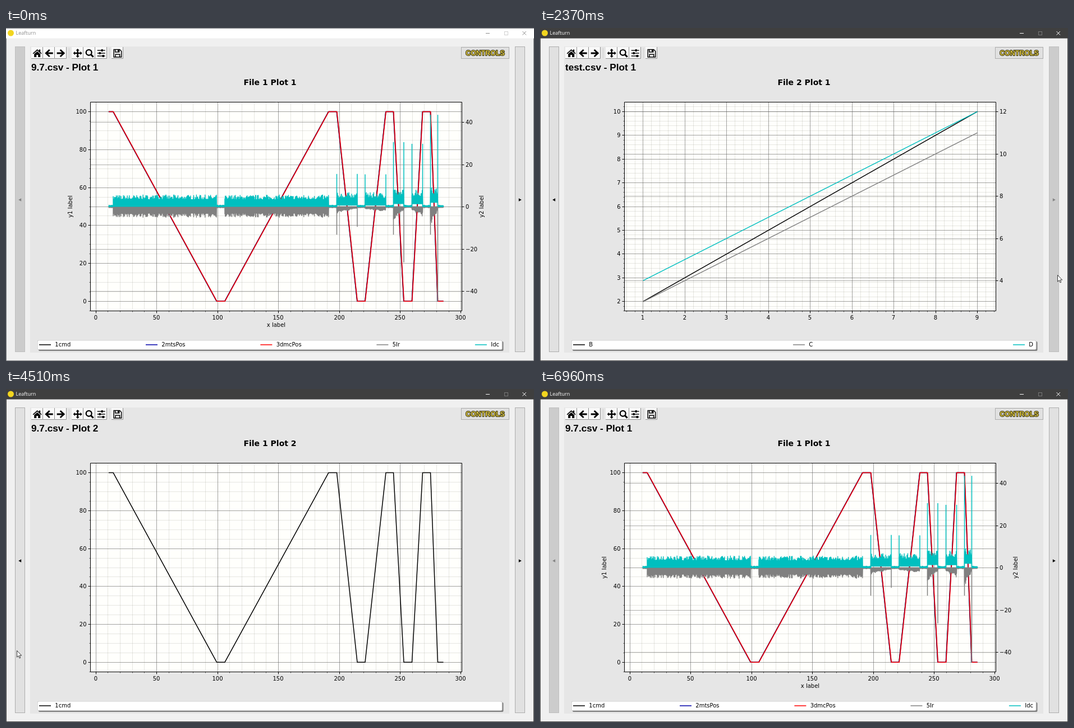
These frames come from a looping animation (941x595 px, 7010 ms). An HTML page with a canvas:

```html
<!DOCTYPE html>
<html lang="en">
<head>
<meta charset="utf-8">
<title>Leafturn</title>
<style>
html, body { margin: 0; width: 100%; height: 100%; overflow: hidden; background: #f0f0f0; }
canvas { display: block; }
</style>
</head>
<body>
<canvas id="stage" width="941" height="595"></canvas>
<script>
const W = 941, H = 595, LOOP = 7010, STEP = 46;
const BOX = { l: 150.5, r: 812.5, t: 132.5, b: 505.5 };
const SMALL = '10px "DejaVu Sans", sans-serif';
const TITLE = 'bold 14px "DejaVu Sans", sans-serif';
const arial = size => `bold ${size}px "Liberation Sans", Arial, sans-serif`;
const GRAY = '#808080', CYAN = '#00bfbf', BLUE = '#0000a8', RED = '#f00', BLACK = '#000';
const stage = document.getElementById('stage').getContext('2d');
let c = stage;

// ---------- drawing helpers ----------
function rect(x, y, w, h, fill, border) {
  c.fillStyle = fill;
  c.fillRect(x, y, w, h);
  if (border) {
    c.strokeStyle = border;
    c.lineWidth = 1;
    c.strokeRect(x + .5, y + .5, w - 1, h - 1);
  }
}
function line(points, color = BLACK, width = 1) {
  c.beginPath();
  points.forEach(([x, y]) => c.lineTo(x, y));
  c.strokeStyle = color;
  c.lineWidth = width;
  c.stroke();
}
function dot(x, y, r, color) {
  c.beginPath();
  c.arc(x, y, r, 0, 7);
  c.fillStyle = color;
  c.fill();
}
function panel(x, y, w, h, fill) {
  c.beginPath();
  c.roundRect(x, y, w, h, 2);
  c.fillStyle = fill;
  c.fill();
}
function text(s, x, y, font = SMALL, align = 'left', color = BLACK) {
  c.font = font;
  c.textAlign = align;
  c.fillStyle = color;
  c.fillText(s, x, y);
}
function placed(x, y, angle, draw) {
  c.save();
  c.translate(x, y);
  c.rotate(angle);
  draw();
  c.restore();
}
const snap = p => Math.round(p) + .5;

// ---------- plot data: the position holds and moves in turn between these moments ----------
const times = [183, 191, 375.5, 390, 575, 589.5, 626, 640, 677, 690.5, 709, 723.5, 742.5, 756.5, 769.5, 779.5];
const TOP = 149.4, BOTTOM = 488.2, ZERO = 319.3;
const ramp = times.map((x, i) => [x, i % 4 < 2 ? TOP : BOTTOM]);
const phases = times.slice(1).map((x1, i) => {
  const x0 = times[i], speed = i % 2 ? (BOTTOM - TOP) / (x1 - x0) : 0;
  return { x0, x1, speed, fast: speed > 5, falling: i % 4 === 1 };
});

// A jagged band around zero whose size follows the speed, with peaks where fast moves start and stop
function noise(color, { outer, inner, peaks }) {
  let seed = 7;
  const rand = () => (seed = seed * 16807 % 2147483647) / 2147483647;
  const points = [];
  for (const phase of phases) {
    const { x0, x1 } = phase;
    for (let x = x0; x < x1; x += .7) {
      const reach = outer(phase, (x - x0) / (x1 - x0)) * (.6 + .4 * rand() ** 2);
      points.push([x, ZERO - reach], [x + .35, ZERO - inner(phase)]);
    }
  }
  c.lineJoin = 'round';
  line(points, color, 1.4);
  for (const phase of phases.filter(p => p.fast))
    peaks(phase).forEach((size, i) =>
      line([[i ? phase.x1 : phase.x0, ZERO], [i ? phase.x1 : phase.x0, ZERO - size]], color, 1.5));
}
const current = {
  outer: ({ speed }) => speed ? 20 + .6 * speed : 3,
  inner: ({ speed }) => .3 * speed,
  peaks: ({ speed }) => [6.3 * speed, 6.3 * speed]
};
const drag = {
  outer: ({ speed, fast, falling }, k) =>
    fast ? -speed * (falling ? 1.3 - k : .4 + .6 * k) : speed ? -19 : -2,
  inner: () => 0,
  peaks: ({ speed, falling }) => falling ? [-50, -1.27 * speed ** 1.5] : []
};

// ---------- pages: an axis has the pixel of zero, pixels per unit, major and minor step ----------
const timeAxis = { o: 159.7, k: 2.169, major: 50, minor: 10 };
const posAxis = { o: 488, k: -3.39, major: 20, minor: 5 };
const pages = [
  {
    file: '9.7.csv - Plot 1', title: 'File 1 Plot 1', x: timeAxis, y: posAxis,
    y2: { o: 319.2, k: -3.777, major: 20 }, named: true,
    legend: [['1cmd', BLACK], ['2mtsPos', BLUE], ['3dmcPos', RED], ['5Ir', GRAY], ['Idc', CYAN]],
    plot() {
      [BLACK, BLUE, RED].forEach((color, i) =>
        line(ramp.map(([x, y]) => [x + .25 * (i - 1), y]), color, 1.5));
      noise(GRAY, drag);
      noise(CYAN, current);
    }
  },
  {
    file: '9.7.csv - Plot 2', title: 'File 1 Plot 2', x: timeAxis, y: posAxis,
    legend: [['1cmd', BLACK]],
    plot() { line(ramp, BLACK, 1.5); }
  },
  {
    file: 'test.csv - Plot 1', title: 'File 2 Plot 1',
    x: { o: 108.9, k: 74.5, major: 1, minor: .2 },
    y: { o: 573.2, k: -42.44, major: 1, minor: .2 },
    y2: { o: 602, k: -37.75, major: 2 },
    legend: [['B', BLACK], ['C', GRAY], ['D', CYAN]],
    plot() {
      const trend = (axis, first, color) => line([1, 9].map(n =>
        [this.x.o + this.x.k * n + .3, axis.o + axis.k * (first + n - 1) + .3]), color, 1.5);
      trend(this.y, 2, BLACK);
      trend(this.y2, 3, GRAY);
      trend(this.y2, 4, CYAN);
    }
  }];

function ticks({ o, k }, step, lo, hi) {
  const [from, to] = [(lo - o) / k, (hi - o) / k].sort((a, b) => a - b);
  const list = [];
  for (let n = Math.ceil(from / step); n * step <= to; n++)
    list.push({ label: String(n * step).replace('-', '\u2212'), p: snap(o + n * step * k) });
  return list;
}

function drawAxes({ x, y, y2 }) {
  const { l, r, t, b } = BOX;
  const minor = 'rgba(130,130,120,.2)', major = 'rgba(100,100,100,.52)';
  const vert = (p, color, len, width) => {
    line([[p, t], [p, b]], color);
    line([[p, b], [p, b + len]], BLACK, width);
  };
  const horiz = (p, color, from, to, width) => {
    line([[l, p], [r, p]], color);
    line([[from, p], [to, p]], BLACK, width);
  };
  rect(l, t, r - l, b - t, '#fffffc');
  ticks(x, x.minor, l, r).forEach(({ p }) => vert(p, minor, 2, .6));
  ticks(y, y.minor, t, b).forEach(({ p }) => horiz(p, minor, l - 2, l, .6));
  ticks(x, x.major, l, r).forEach(({ label, p }) => {
    vert(p, major, 4);
    text(label, p - .5, 520.5, SMALL, 'center');
  });
  ticks(y, y.major, t, b).forEach(({ label, p }) => {
    horiz(p, major, l - 4, l);
    text(label, 143.5, p + 3.3, SMALL, 'right');
  });
  if (y2) ticks(y2, y2.major, t, b).forEach(({ label, p }) => {
    horiz(p, major, r, r + 4);
    text(label, 819, p + 3.3);
  });
}

// Entries spread evenly from edge to edge
function drawLegend(items) {
  const left = 59, right = 879, lead = 28.3;
  panel(58, 560, 828.5, 17, GRAY);
  panel(56, 557.7, 828.5, 17, '#ccc');
  panel(56.7, 558.4, 827, 15.8, '#fff');
  c.font = SMALL;
  const widths = items.map(([name]) => lead + c.measureText(name).width);
  const gap = (right - left - widths.reduce((a, b) => a + b)) / (items.length - 1);
  let x = left;
  items.forEach(([name, color], i) => {
    line([[x, 566], [x + 21, 566]], color, 1.5);
    text(name, x + lead, 569);
    x += widths[i] + gap;
  });
}

// ---------- toolbar ----------
const fill = shape => c.fill(new Path2D(shape));
const arrowIcon = () => fill('M-7.5 0L0-7L2-5.2L-1.8-1.5H7V1.5H-1.8L2 5.2L0 7Z');
const icons = [
  [55, () => fill('M-8 .2L0-7L3-4.3V-6.5H5.5V-2L8 .2L7 1.4L0-4.7L-7 1.4ZM-5.5 1.5L0-3.2L5.5 1.5V7H1.5V3H-1.5V7H-5.5Z')],
  [76, arrowIcon],
  [97, () => { c.rotate(Math.PI); arrowIcon(); }],
  [127, () => {
    for (let i = 0; i < 4; i++) {
      fill('M0-8L3.2-4.8H1.2V0H-1.2V-4.8H-3.2Z');
      c.rotate(Math.PI / 2);
    }
  }],
  [148, () => {
    dot(-1, -1.2, 6.1, BLACK);
    dot(-1, -1.2, 3.8, '#f9f9f9');
    line([[2.8, 2.6], [7, 6.8]], BLACK, 3);
  }],
  [169, () => [1, -3, 3].forEach((knob, i) => {
    rect(-7, i * 5 - 5.7, 14, 1.4, BLACK);
    rect(knob - 1, i * 5 - 7, 3, 4, BLACK);
  })],
  [198, () => {
    c.lineWidth = 1.5;
    c.stroke(new Path2D('M-6.5-6.5H4L7-3.5V7H-6.5ZM-4-6.5V-2H3V-6.5M-3.5 7V2H4V7'));
    rect(.3, -6, 2, 3, BLACK);
  }]];

function drawToolbar() {
  for (const [x, draw] of icons) {
    rect(x - 10, 34, 21, 21, '#f9f9f9');
    line([[x - 10, 54.5], [x + 10.5, 54.5], [x + 10.5, 34]], '#909090');
    c.fillStyle = c.strokeStyle = BLACK;
    placed(x + .7, 45, 0, draw);
  }
  for (const x of [112.5, 184.5]) line([[x, 36], [x, 54]], '#d0d0d0');
  rect(811, 34, 86, 21, '#e1e1e1', '#adadad');
  c.font = arial(12.4);
  c.textAlign = 'center';
  c.lineJoin = 'round';
  c.lineWidth = 1.9;
  c.strokeStyle = '#2e2a10';
  c.strokeText('CONTROLS', 854, 49);
  text('CONTROLS', 854, 49, arial(12.4), 'center', '#dcc640');
}

function renderPage(page) {
  const canvas = Object.assign(document.createElement('canvas'), { width: W, height: H });
  const { l, r, t, b } = BOX;
  c = canvas.getContext('2d');
  rect(0, 0, W, H, '#f0f0f0');
  rect(43, 33, 854, 547, '#e6e6e6');
  drawToolbar();
  text(page.file, 45, 75.5, arial(17.2));
  text(page.title, 470.5, 102.3, TITLE, 'center');
  drawAxes(page);
  page.plot();
  c.strokeStyle = BLACK;
  c.lineWidth = 1;
  c.strokeRect(l, t, r - l, b - t);
  if (page.named) {
    text('x label', 481.5, 534, SMALL, 'center');
    placed(117.5, 319, -Math.PI / 2, () => text('y1 label', 0, 0, SMALL, 'center'));
    placed(850.5, 319, -Math.PI / 2, () => text('y2 label', 0, 0, SMALL, 'center'));
  }
  drawLegend(page.legend);
  c = stage;
  return canvas;
}
const sheets = pages.map(renderPage);

// ---------- window parts ----------
function drawTitleBar(active) {
  const ink = active ? '#fff' : '#8c8c8c', dim = active ? '#777' : '#d0d0d0';
  c.strokeStyle = active ? '#404040' : '#75787c';
  c.lineWidth = 1;
  c.strokeRect(.5, .5, W - 1, H - 1);
  rect(0, active ? 0 : 1, W, active ? 18.5 : 17.5, active ? '#3f3f3f' : '#fff');
  dot(8.5, 9, 5.5, '#f2d51f');
  text('Leafturn', 17.5, 12.3, '9px "Open Sans", sans-serif', 'left', ink);
  line([[855, 9.5], [862, 9.5]], ink);
  c.strokeStyle = dim;
  c.strokeRect(888.5, 6.5, 6, 6);
  line([[920.5, 6], [927, 12.5]], ink);
  line([[927, 6], [920.5, 12.5]], ink);
}

const looks = {
  normal: ['#e1e1e1', '#adadad', BLACK],
  hover: ['#e5f1fb', '#0078d7', BLACK],
  pressed: ['#cce4f7', '#1f6cad', BLACK],
  disabled: ['#cccccc', '#bfbfbf', '#838383']
};
function drawTurner(x, dir, state) {
  const [face, border, ink] = looks[state];
  rect(x, 33, 18, 546, face, border);
  c.fillStyle = ink;
  placed(x + 9, 307, dir < 0 ? Math.PI : 0, () => fill('M2.8 0L-2.2-2.8V2.8Z'));
}

// ---------- pointer: start time, then step, x, y ----------
const moves = [
  [150, [[0, 936, 455], [5, 922, 441]]],
  [2600, [[-1, 922, 441], [12, 306, 530], [15, 155, 546], [22, 14, 488], [25, 19, 467]]],
  [5760, [[-1, 19, 467], [8, 390, 41], [15, 816, 453], [25, 882, 590], [26, 884, 600]]]];

// Smooth curve through the keys, at rest at both ends
function pointerAt(t) {
  const move = moves.filter(([start]) => t >= start).pop();
  if (!move) return null;
  const [start, keys] = move, last = keys.length - 1;
  const s = Math.min(Math.floor((t - start) / STEP + .27), keys[last][0]);
  let i = 0;
  while (i < last - 1 && s > keys[i + 1][0]) i++;
  const a = keys[i], b = keys[i + 1], span = b[0] - a[0], u = (s - a[0]) / span;
  const slope = (j, d) => j === 0 || j === last ? 0
    : (keys[j + 1][d] - keys[j - 1][d]) / (keys[j + 1][0] - keys[j - 1][0]);
  const value = d => a[d] + (b[d] - a[d]) * u * u * (3 - 2 * u)
    + span * u * (1 - u) * (slope(i, d) * (1 - u) - slope(i + 1, d) * u);
  return { x: Math.round(value(1)), y: Math.round(value(2)) };
}

const arrow = new Path2D('M.5 .5V12.2L3.2 9.7L5 14L6.8 13.2L5 9.1H8.7Z');
function drawPointer({ x, y }, clicking) {
  if (clicking) dot(x, y + 1, 8.5, 'rgba(245,240,0,.62)');
  placed(x, y, 0, () => {
    c.fillStyle = '#fff';
    c.fill(arrow);
    c.strokeStyle = '#222';
    c.lineWidth = .9;
    c.stroke(arrow);
  });
}

// ---------- timeline ----------
const within = (t, ...spans) => spans.some(([a, b]) => t >= a && t < b);

function draw(t) {
  const page = t < 970 ? 0 : t < 2370 ? 1 : t < 4510 ? 2 : t < 5480 ? 1 : 0;
  const pointer = pointerAt(t);
  const state = (x, disabled, pressed, awake) =>
    disabled ? 'disabled' : pressed ? 'pressed'
    : awake && pointer && pointer.x >= x && pointer.x < x + 18 ? 'hover' : 'normal';
  c.drawImage(sheets[page], 0, 0);
  drawTurner(16, -1, state(16, page === 0, within(t, [3950, 4510], [5050, 5480]), t < 4510));
  drawTurner(907, 1, state(907, page === 2, within(t, [690, 970], [1990, 2370]), t < 970));
  drawTitleBar(t >= 690);
  if (pointer) drawPointer(pointer, within(t, [690, 740], [1990, 2090], [3950, 4050], [5050, 5150]));
}

const begin = performance.now();
function tick() {
  draw((performance.now() - begin) % LOOP);
  requestAnimationFrame(tick);
}
tick();
</script>
</body>
</html>
```
